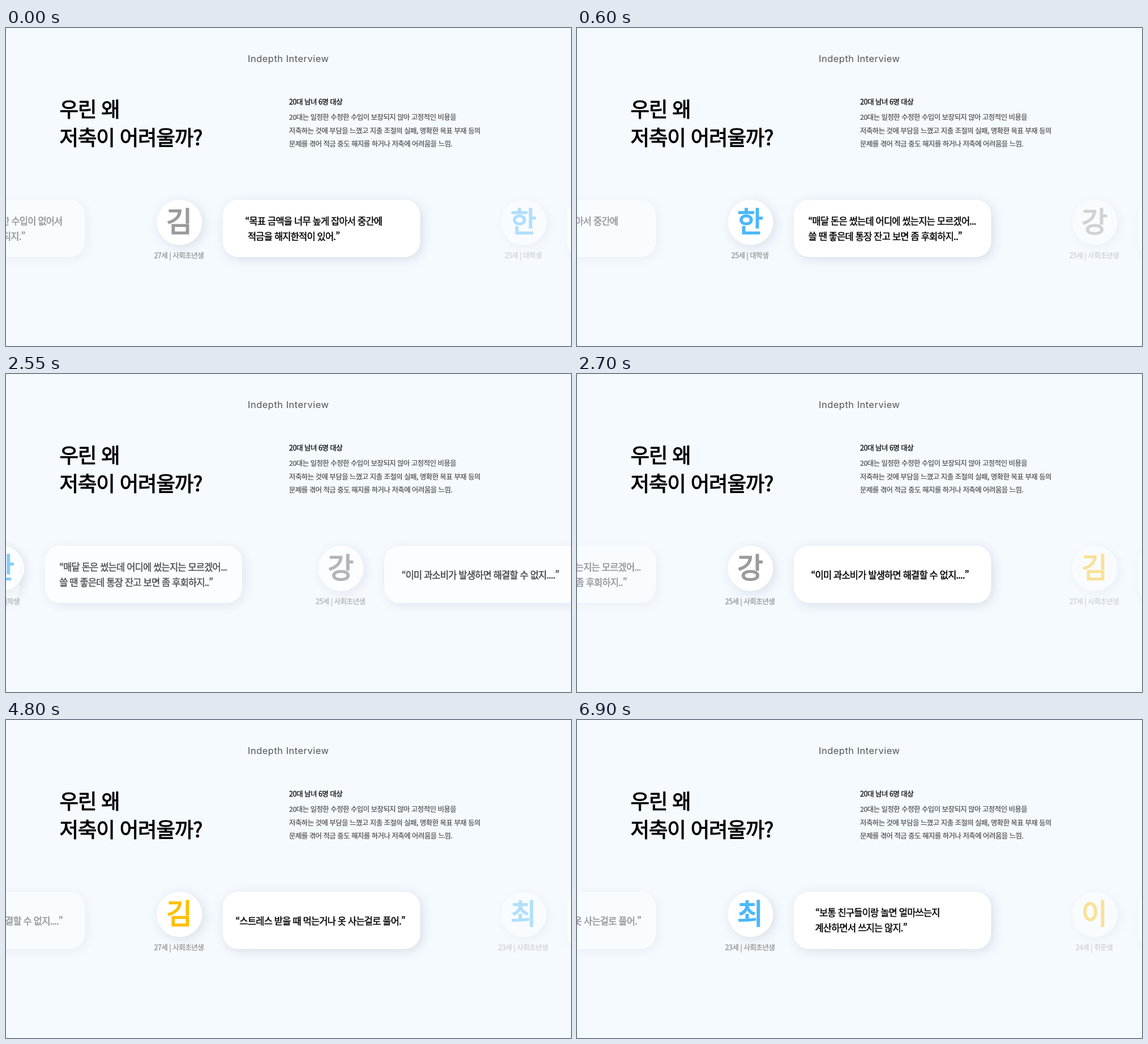
Recreate the animation shown at these times as an HTML page. Size 998x561 px, loop 8 s.

```html
<!DOCTYPE html>
<html lang="ko">
<head>
<meta charset="utf-8">
<title>Indepth Interview</title>
<style>
  html, body { margin: 0; width: 100%; height: 100%; overflow: hidden; background: #f5faff; }
  svg { display: block; width: 100%; height: 100%; }
  /* A thin outline in the text colour gives a medium weight */
  text { font-family: "Noto Sans CJK KR", "Noto Sans CJK JP", "Noto Sans CJK", sans-serif;
         letter-spacing: -.04em; white-space: pre; color: #000;
         fill: currentColor; stroke: currentColor; stroke-width: .028em; stroke-linejoin: round; }
  .section { font: 400 16.5px Inter, sans-serif; letter-spacing: .029em; color: #555; stroke: none; }
  .title { font-size: 36.5px; letter-spacing: -.033em; }
  .lead { font-size: 12.5px; color: #111; }
  .body { font-size: 12.4px; color: #444; stroke-width: .015em; }
  .panel { fill: #fff; filter: drop-shadow(4px 4px 10px rgba(0, 25, 45, .12)); }
  .initial { font-size: 50px; letter-spacing: 0; text-anchor: middle; stroke-width: .036em; }
  .label { font-size: 12.5px; color: #999; text-anchor: middle; }
  .quote { font-size: 16.5px; letter-spacing: -.049em; }
  .end { text-anchor: end; }
</style>
</head>
<body>
<svg id="stage" viewBox="0 0 998 561">
  <text class="section" x="427" y="59.5">Indepth Interview</text>
  <text class="title" x="94.5" y="156.5">우린 왜</text>
  <text class="title" x="94.5" y="207">저축이 어려울까?</text>
  <text class="lead" x="500" y="135">20대 남녀 6명 대상</text>
  <text class="body" x="500" y="162">20대는 일정한 수정한 수입이 보장되지 않아 고정적인 비용을</text>
  <text class="body" x="500" y="185.5">저축하는 것에 부담을 느꼈고 지출 조절의 실패, 명확한 목표 부재 등의</text>
  <text class="body" x="500" y="208.8">문제를 겪어 적금 중도 해지를 하거나 저축에 어려움을 느낌.</text>
</svg>
<script>
const GRAY = '#9b9b9b', BLUE = '#4bb8fa', YELLOW = '#ffbf00';
const LOOP = 8000, FRAME = 30, FIRST_MOVE = 294.6, PERIOD = 2100, MOVE = 300;

// Each quote line: [x, baseline, text, optional class]
const people = [
  { initial: '김', color: GRAY, label: '27세 | 사회초년생', lines: [
    [422.5, 347, '“목표 금액을 너무 높게 잡아서 중간에'], [427, 374, '적금을 해지한적이 있어.”']] },
  { initial: '한', color: BLUE, label: '25세 | 대학생', lines: [
    [408.5, 347, '“매달 돈은 썼는데 어디에 썼는지는 모르겠어...'], [408.5, 374, '쓸 땐 좋은데 통장 잔고 보면 좀 후회하지..”']] },
  { initial: '강', color: GRAY, label: '25세 | 사회초년생', lines: [
    [413.5, 361, '“이미 과소비가 발생하면 해결할 수 없지....”']] },
  { initial: '김', color: YELLOW, label: '27세 | 사회초년생', lines: [
    [405.5, 361, '“스트레스 받을 때 먹는거나 옷 사는걸로 풀어.”']] },
  { initial: '최', color: BLUE, label: '23세 | 사회초년생', lines: [
    [421, 345.5, '“보통 친구들이랑 놀면 얼마쓰는지'], [420.5, 372.5, '계산하면서 쓰지는 않지.”']] },
  { initial: '이', color: YELLOW, label: '24세 | 취준생', lines: [
    [691.5, 347, '“일정한 수입이 없어서', 'end'], [625.5, 374, '저축이 안되지.”', 'end']] },
];

const stage = document.getElementById('stage');

function add(parent, tag, attrs = {}, content = '') {
  const node = document.createElementNS('http://www.w3.org/2000/svg', tag);
  for (const key in attrs) node.setAttribute(key, attrs[key]);
  node.textContent = content;
  return parent.appendChild(node);
}

const slides = people.map(({ initial, color, label, lines }) => {
  const slide = add(stage, 'g');
  add(slide, 'circle', { class: 'panel', cx: 306.5, cy: 343, r: 40 });
  add(slide, 'text', { class: 'initial', x: 306, y: 360.3, style: `color: ${color}` }, initial);
  add(slide, 'text', { class: 'label', x: 305.5, y: 406 }, label);
  add(slide, 'rect', { class: 'panel', x: 383, y: 303, width: 348.5, height: 101, rx: 27 });
  for (const [x, y, words, align = ''] of lines)
    add(slide, 'text', { class: 'quote ' + align, x, y }, words);
  return slide;
});

// cubic-bezier(.42, 0, .58, 1), solved by bisection
function easeInOut(x) {
  let low = 0, high = 1;
  for (let i = 0; i < 24; i++) {
    const s = (low + high) / 2;
    if (1.26 * s - .78 * s * s + .52 * s ** 3 < x) low = s; else high = s;
  }
  return low * low * (3 - 2 * low);
}

// Offset from the centre slot; slides that have left move more slowly
function slotX(d) {
  if (d < -1) return -592 + 218 * (d + 1);
  return d * (d < 0 ? 592 : 608);
}

function draw(now) {
  const t = Math.floor(now % LOOP / FRAME) * FRAME;
  const cycle = Math.floor((t - FIRST_MOVE) / PERIOD);
  const elapsed = t - FIRST_MOVE - cycle * PERIOD;
  const position = cycle + (elapsed < MOVE ? easeInOut(elapsed / MOVE) : 1);
  slides.forEach((slide, i) => {
    const d = (i - position + 2 + 6) % 6 - 2;
    slide.setAttribute('transform', `translate(${slotX(d)} 0)`);
    slide.setAttribute('opacity', 1 - .6 * Math.min(1, Math.abs(d)));
  });
  requestAnimationFrame(draw);
}
requestAnimationFrame(draw);
</script>
</body>
</html>
```
